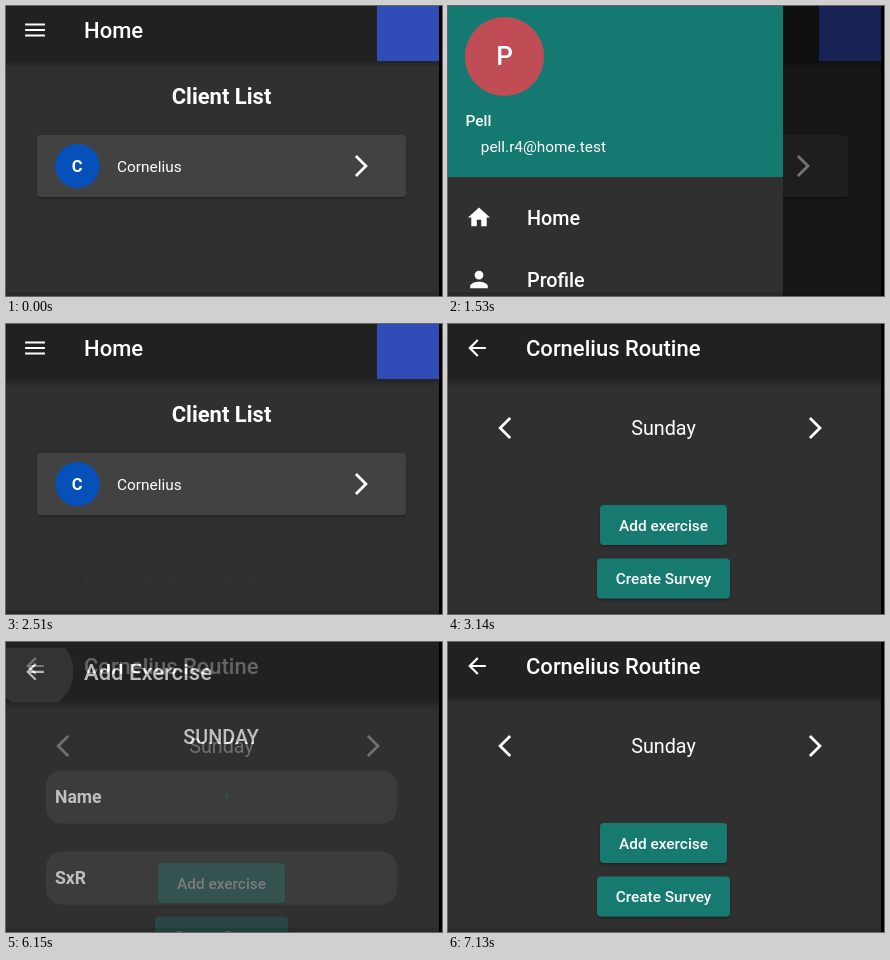
Recreate the animation shown at these times as an HTML page. Size 436 px wide and 290 px high, loop 7.28 s.

```html
<!DOCTYPE html>
<html lang="en">
<head>
<meta charset="utf-8">
<title>Training planner</title>
<style>
  html, body { margin: 0; width: 100%; height: 100%; overflow: hidden; background: #000; }
  svg { display: block; width: 100%; height: 100%; }
  text { font-family: Roboto, "Open Sans", sans-serif; fill: #fff; white-space: pre; }
</style>
</head>
<body>
<svg id="stage" viewBox="0 0 436 290"></svg>
<script>
const LOOP = 7280, STEP = 70, FIRST = 60;
const DP = 1.1, RISE = 234, DRAWER = 335;
const TEAL = '#147a71', CARD = '#424242';

const ICONS = {
  menu: 'M3 18h18v-2H3zM3 13h18v-2H3zM3 6v2h18V6z',
  back: 'M20 11H7.83l5.59-5.59L12 4l-8 8 8 8 1.41-1.41L7.83 13H20z',
  next: 'M6.23 20.23 8 22 18 12 8 2 6.23 3.77 14.46 12z',
  prev: 'M17.77 3.77 16 2 6 12l10 10 1.77-1.77L9.54 12z',
  home: 'M10 20v-6h4v6h5v-8h3L12 3 2 12h3v8z',
  person: 'M12 12a4 4 0 1 0 0-8 4 4 0 0 0 0 8zm0 2c-2.67 0-8 1.34-8 4v2h16v-2c0-2.66-5.33-4-8-4z'
};

const rect = (x, y, w, h, fill, r = 0, more = '') =>
  `<rect x="${x}" y="${y}" width="${w}" height="${h}" rx="${r}" fill="${fill}" ${more}/>`;
const circle = (x, y, r, fill, more = '') =>
  `<circle cx="${x}" cy="${y}" r="${r}" fill="${fill}" ${more}/>`;
const label = (x, y, size, weight, str, anchor = 'start') =>
  `<text x="${x}" y="${y}" font-size="${size}" font-weight="${weight}" text-anchor="${anchor}">${str}</text>`;
const icon = (name, cx, cy) =>
  `<path d="${ICONS[name]}" fill="#fff" transform="translate(${cx - 12 * DP} ${cy - 12 * DP}) scale(${DP})"/>`;
const raised = (x, y, w, h, fill) =>
  rect(x, y, w, h, fill, 4, 'filter="url(#lift)"');

const page = (id, lead, title, body, onBar = '') => `<g id="${id}">
  ${rect(0, 0, 433, 290, '#303030')}
  ${rect(0, 54, 433, 8, 'url(#barShade)')}
  ${rect(0, 0, 433, 54.5, '#212121')}
  ${onBar}${icon(lead, 29, 24)}${label(78, 32, 22, 500, title)}
  ${body}</g>`;

const button = (x, y, w, str) =>
  raised(x, y, w, 40, TEAL) + label(x + w / 2, y + 25.8, 15.4, 500, str, 'middle');
const field = (y, str) =>
  rect(40, y, 351, 53.5, CARD, 16) + label(49, y + 32.5, 17.6, 700, str);
const drawerItem = (y, name, str) =>
  icon(name, 31, y) + label(79, y + 7, 19.8, 500, str);

const home = page('home', 'menu', 'Home',
  rect(371, 0, 62, 55, '#304db7') +
  label(215.5, 98, 22, 700, 'Client List', 'middle') +
  raised(31, 129, 369, 62, CARD) +
  circle(71.5, 160, 22.2, '#0551b9') +
  label(71.2, 166, 16.5, 700, 'C', 'middle') +
  label(111, 166, 15.4, 400, 'Cornelius') +
  icon('next', 355.3, 160));

const routine = page('routine', 'back', 'Cornelius Routine',
  icon('prev', 56.8, 104) + icon('next', 367.3, 104) +
  label(215.5, 111, 19.8, 400, 'Sunday', 'middle') +
  `<path id="spinner" fill="none" stroke="${TEAL}" stroke-width="4.4"/>` +
  `<g id="buttons">${button(152, 181, 127, 'Add exercise')}${button(149, 234.5, 133, 'Create Survey')}</g>`);

const exercise = page('exercise', 'back', 'Add Exercise',
  label(215, 96, 19.8, 500, 'SUNDAY', 'middle') +
  field(122.5, 'Name') + field(203.5, 'SxR') + field(284.5, ''),
  circle(29, 24, 38.5, '#fff', 'id="ripple" fill-opacity=".12" clip-path="url(#bar)"'));

const drawer = `<rect id="scrim" width="433" height="290"/>
  <g id="drawer">
    ${rect(0, 0, DRAWER, 290, '#303030')}
    ${rect(0, 0, DRAWER, 171, TEAL)}
    ${circle(56.5, 50.5, 39.6, '#c04d55')}
    ${label(56.5, 59, 26, 500, 'P', 'middle')}
    ${label(17.6, 120, 15.4, 500, 'Pell')}
    ${label(158, 146, 15.4, 400, 'pell.r4@home.test', 'end')}
    ${drawerItem(211.5, 'home', 'Home')}
    ${drawerItem(273.5, 'person', 'Profile')}
  </g>`;

const stage = document.getElementById('stage');
stage.innerHTML = `<defs>
    <linearGradient id="barShade" x2="0" y2="1">
      <stop stop-color="#000" stop-opacity=".32"/><stop offset="1" stop-color="#000" stop-opacity="0"/>
    </linearGradient>
    <filter id="lift" x="-5%" y="-15%" width="110%" height="140%">
      <feDropShadow dx="0" dy="1.5" stdDeviation="1.3" flood-opacity=".35"/>
    </filter>
    <clipPath id="bar"><rect width="433" height="54.5"/></clipPath>
  </defs>
  ${home}${routine}${exercise}${drawer}
  ${rect(0, 286, 433, 4, '#000', 0, 'opacity=".12"')}
  ${rect(433, 0, 3, 290, '#000')}`;

const el = {};
stage.querySelectorAll('g[id], path[id], rect[id], circle[id]').forEach(n => el[n.id] = n);

const clamp = v => Math.max(0, Math.min(1, v));

function bezier(x1, y1, x2, y2) {
  const at = (a, b, s) => 3 * a * s * (1 - s) ** 2 + 3 * b * s * s * (1 - s) + s ** 3;
  return x => {
    if (x <= 0 || x >= 1) return clamp(x);
    let lo = 0, hi = 1;
    for (let i = 0; i < 24; i++) {
      const mid = (lo + hi) / 2;
      if (at(x1, x2, mid) < x) lo = mid; else hi = mid;
    }
    return at(y1, y2, lo);
  };
}
const slide = bezier(.4, 0, .2, 1);
const fade = bezier(.42, 0, 1, 1);

// A page fades in while rising into place.
function showPage(node, p) {
  node.style.display = p > 0 ? '' : 'none';
  node.setAttribute('opacity', fade(p));
  node.setAttribute('transform', `translate(0 ${RISE * (1 - slide(p))})`);
}

function arc(ms) {
  const u = ms / 1333;
  const tail = slide(clamp(2 * u - 1)) * 270;
  const sweep = Math.max(slide(clamp(2 * u)) * 270 - tail, .5);
  const start = -90 + tail + ms / 2222 * 360 + u * 90;
  const point = deg => {
    const a = deg * Math.PI / 180;
    return `${215.5 + 17.8 * Math.cos(a)} ${172 + 17.8 * Math.sin(a)}`;
  };
  return `M${point(start)}A17.8 17.8 0 ${sweep > 180 ? 1 : 0} 1 ${point(start + sweep)}`;
}

function showLoading(t) {
  const from = [2500, 6090].find(s => t >= s && t < s + 420);
  const busy = from !== undefined;
  el.spinner.style.display = busy ? '' : 'none';
  if (busy) el.spinner.setAttribute('d', arc(t - from));
  el.buttons.setAttribute('transform', `translate(0 ${busy ? 40 : 0})`);
}

function showDrawer(t) {
  const p = t < 830 ? 0 : clamp(.81 + (t - 830) / 246) - clamp((t - 1640) / 246);
  el.drawer.style.display = p > 0 ? '' : 'none';
  el.drawer.setAttribute('transform', `translate(${DRAWER * (p - 1)} 0)`);
  el.scrim.setAttribute('opacity', .54 * p);
}

function draw(now) {
  const time = now % LOOP;
  const t = Math.max(0, FIRST + STEP * Math.floor((time - FIRST) / STEP));
  showDrawer(t);
  showPage(el.routine, clamp((t - 2500) / 300));
  showPage(el.exercise, clamp((t - 3400) / 300) - clamp((t - 6090) / 300));
  el.ripple.style.display = t >= 6090 ? '' : 'none';
  showLoading(t);
}

const begin = performance.now();
function tick() {
  draw(performance.now() - begin);
  requestAnimationFrame(tick);
}
tick();
</script>
</body>
</html>
```
